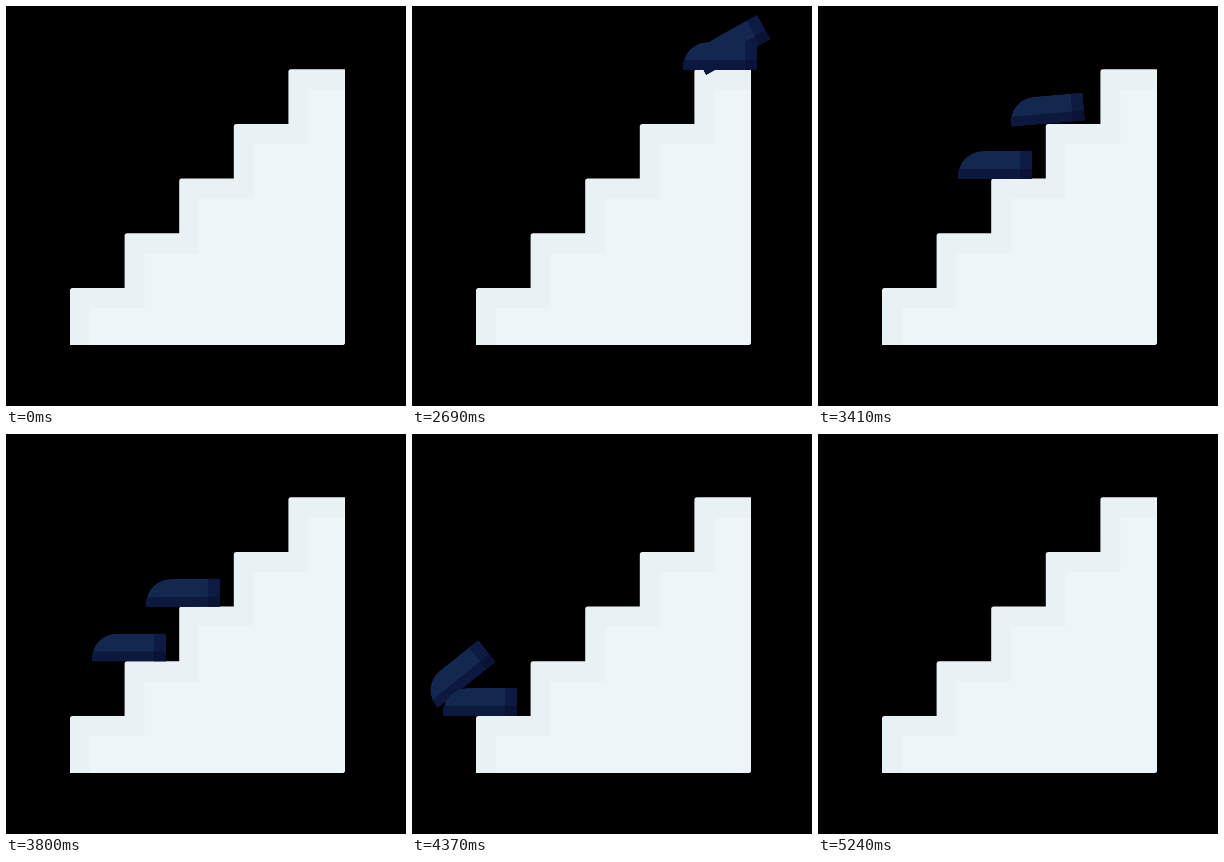
An HTML page that plays this animation: 400x400 px, repeating every 5.45 s.

```html
<!DOCTYPE html>
<html lang="en">
<head>
<meta charset="utf-8">
<title>Shoes walking down stairs</title>
<style>
html, body { margin: 0; width: 100%; height: 100%; overflow: hidden; background: #000; }
svg { display: block; width: 100vw; height: 100vh; }
</style>
</head>
<body>
<svg viewBox="0 0 400 400">
  <defs>
    <path id="outline" d="M-37 14v-3A25 25 0 0 1-12-14H37V14Z"/>
    <clipPath id="cut"><use href="#outline"/></clipPath>
    <g id="shoe" clip-path="url(#cut)">
      <use href="#outline" fill="#14284f"/>
      <rect x="25" y="-14" width="12" height="28" fill="#0d1a41"/>
      <rect x="-37" y="4" width="74" height="10" fill="#0c183d"/>
      <rect x="25" y="4" width="12" height="10" fill="#0a1235"/>
    </g>
  </defs>
  <path id="edge" fill="#e8f1f4"/>
  <path id="face" fill="#eef5f8"/>
  <use id="right" href="#shoe"/>
  <use id="left" href="#shoe"/>
</svg>
<script>
const LOOP = 5450, SLOT = 405;
const $ = id => document.getElementById(id);

// Staircase outline, inset from the top left by d, with corner radius r
function stairs(d, r) {
  let path = `M${64 + d} 339`;
  for (let i = 0; i < 5; i++) {
    const x = 64 + d + 54.6 * i, y = 282 + d - 54.7 * i;
    path += `V${y + r}Q${x} ${y} ${x + r} ${y}H${i < 4 ? x + 54.6 : 339}`;
  }
  return path + 'V336Q339 339 336 339Z';
}
$('edge').setAttribute('d', stairs(0, 2.5));
$('face').setAttribute('d', stairs(20, 0));

// Hops: start, duration, x, y, lift, tilt
const hop = (start, x, y, lift = 52, tilt = 40, span = SLOT) => ({ start, span, x, y, lift, tilt });
const shoes = [
  { node: $('left'), x: 440, y: 50, hops: [
    hop(2180, 308, 50, 14.5, 23),
    hop(2990, 177, 159, 63),
    hop(3800, 68, 268),
    hop(4610, -54, 322)
  ] },
  { node: $('right'), x: 530, y: 50, hops: [
    hop(1950, 387, 50, 14, 26, 230),
    hop(2585, 231.5, 104.5),
    hop(3395, 123, 213.5),
    hop(4205, 12.5, 322.5),
    hop(5015, -47, 322)
  ] }
];

// cubic-bezier(.25, .1, .25, 1)
function ease(t) {
  const curve = (a, b, u) => 3 * a * u * (1 - u) ** 2 + 3 * b * u * u * (1 - u) + u ** 3;
  let lo = 0, hi = 1;
  for (let i = 0; i < 20; i++) {
    const mid = (lo + hi) / 2;
    if (curve(.25, .25, mid) < t) lo = mid; else hi = mid;
  }
  return curve(.1, 1, lo);
}

function pose(shoe, now) {
  let { x, y } = shoe;
  for (const h of shoe.hops) {
    if (now < h.start) break;
    const t = (now - h.start) / h.span;
    if (t < 1) {
      const p = ease(t), s = Math.sin(Math.PI * t);
      return [x + (h.x - x) * p, y + (h.y - y) * p - h.lift * s ** 1.3, -h.tilt * s];
    }
    ({ x, y } = h);
  }
  return [x, y, 0];
}

function draw() {
  const now = performance.now() % LOOP;
  for (const shoe of shoes) {
    const [x, y, angle] = pose(shoe, now);
    shoe.node.setAttribute('transform', `translate(${x} ${y}) rotate(${angle})`);
  }
  requestAnimationFrame(draw);
}
draw();
</script>
</body>
</html>
```
